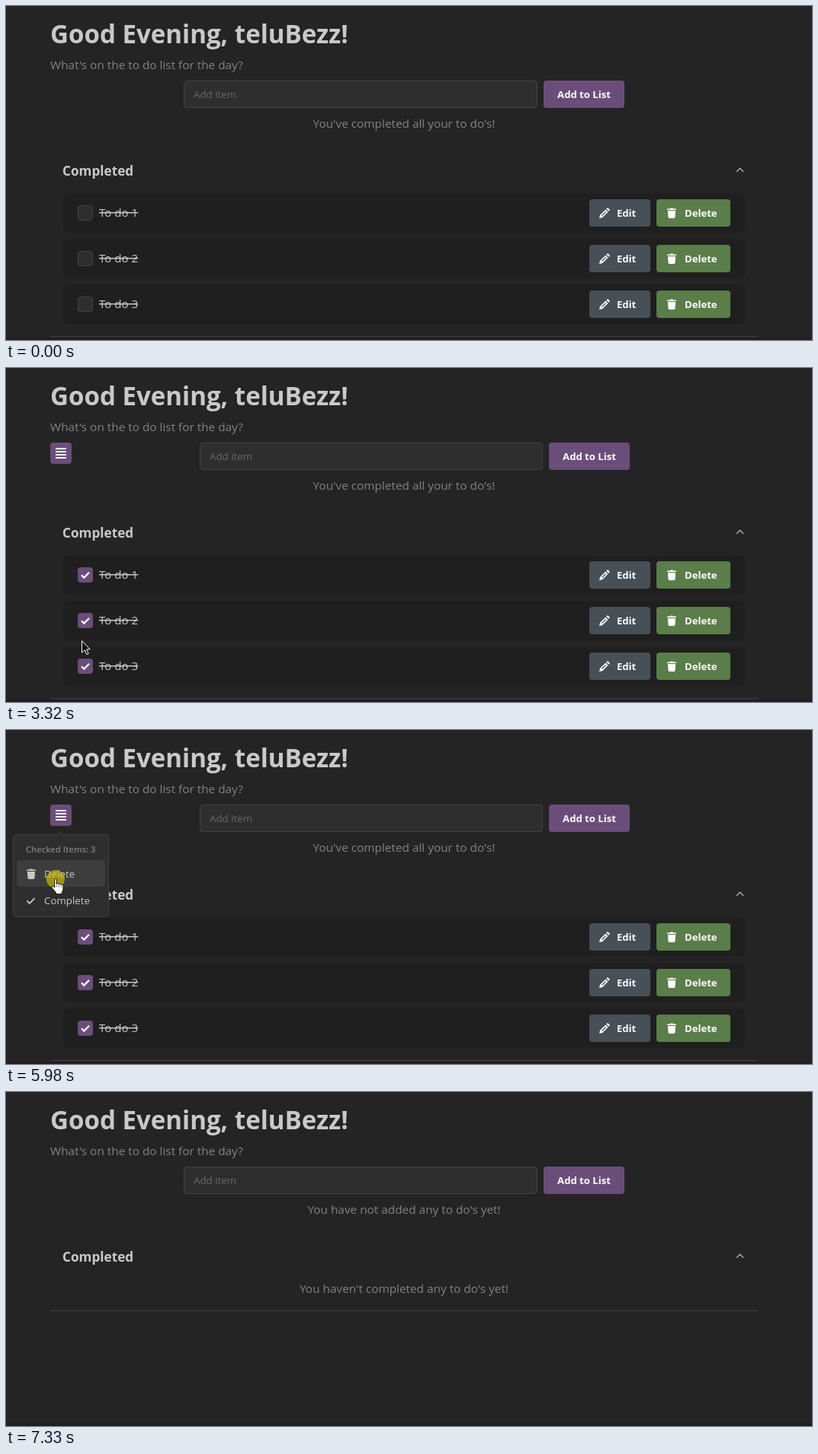
Write an HTML page that moves like this. It is 1057x439 px and loops after 7870 ms.

```html
<!DOCTYPE html>
<html lang="en">
<head>
<meta charset="utf-8">
<title>To do list</title>
<style>
html, body { margin: 0; width: 100%; height: 100%; overflow: hidden; background: #242424; }
svg { display: block; font-family: "Open Sans", "Noto Sans", sans-serif; }
.title { font-size: 33.1px; font-weight: 700; fill: #c9c9c9; }
.head { font-size: 17.2px; font-weight: 700; fill: #c9c9c9; }
.info { font-size: 15.35px; fill: #828282; }
.hint { font-size: 13.3px; fill: #696969; }
.todo { font-size: 15.1px; fill: #c9c9c9; text-decoration: line-through; }
.btn { font-size: 13.1px; font-weight: 700; fill: #fff; }
.label { font-size: 11.2px; font-weight: 600; fill: #828282; }
.item { font-size: 13.3px; fill: #c9c9c9; }
.field { fill: #2e2e2e; stroke: #424242; }
</style>
</head>
<body>
<svg id="stage" width="1057" height="439" viewBox="0 0 1057 439"></svg>
<script>
const LOOP = 7870;
const PURPLE = '#6b4d7a';
const TRASH = 'M0 1.5H3.8L4.5.6H7.5L8.2 1.5H12V3H0ZM.9 4H11.1L10.5 12.6Q10.4 14 9 14H3Q1.6 14 1.5 12.6Z';
const PENCIL = 'M0 14L1 9.8 8.3 2.5 11.5 5.7 4.2 13ZM9.2 1.6L10.4.4Q11 0 11.6.4L13.6 2.4Q14 3 13.6 3.6L12.4 4.8Z';

const text = (cls, x, y, s, extra = '') => `<text class="${cls}" x="${x}" y="${y}" ${extra}>${s}</text>`;
const rect = (x, y, w, h, r, attrs) => `<rect x="${x}" y="${y}" width="${w}" height="${h}" rx="${r}" ${attrs}/>`;
const icon = (d, x, y, fill) => `<path d="${d}" transform="translate(${x} ${y})" fill="${fill}"/>`;
const tick = (x, y, color, width) =>
  `<path d="M${x} ${y}l3.4 3.4 6.6-6.8" fill="none" stroke="${color}" stroke-width="${width}"/>`;
const group = (id, body, attrs = '') => `<g id="${id}" ${attrs}>${body}</g>`;

function row(i) {
  const y = 246 + 60 * i;
  return rect(74, y, 896, 52, 8, 'fill="#1f1f1f"')
    + rect(94.5, y + 16.5, 19, 19, 3.5, 'class="field"')
    + group('check' + i, rect(94, y + 16, 20, 20, 4, `fill="${PURPLE}"`) + tick(99, y + 26.2, '#fff', 2.3))
    + text('todo', 122, y + 31, 'To do ' + (i + 1))
    + rect(765, y + 8, 80, 36, 4, 'fill="#474f57"')
    + icon(PENCIL, 778, y + 19, '#fff')
    + `<path d="M781.5 ${y + 29.5}l5-5" stroke="#474f57" stroke-width="1.2"/>`
    + text('btn', 801, y + 31, 'Edit')
    + rect(853, y + 8, 97, 36, 4, 'fill="#5a7d4a"')
    + icon(TRASH, 867, y + 19, '#fff')
    + text('btn', 890, y + 31, 'Delete');
}

const listIcon = [106, 110, 114, 118].map(y => `M65 ${y}h14`).join('');
const menu = rect(9.5, 137.5, 125, 108, 4, 'class="field"')
  + '<path d="M67.5 138L71.5 134 75.5 138" class="field"/>'
  + rect(14, 171, 116, 35, 4, 'id="menuHover" fill="#3d3d3d"')
  + text('label', 26, 161, 'Checked Items: 3')
  + icon(TRASH, 27, 182, '#c9c9c9') + text('item', 50, 194, 'Delete')
  + tick(27.5, 224.5, '#c9c9c9', 1.8) + text('item', 50, 229, 'Complete');

const middle = 'text-anchor="middle"';
const arrow = '<path d="M.5.5V16.2L4.2 12.7 6.8 18.6 9.2 17.5 6.6 11.8H11.2Z" fill="#0c0c0c" stroke="#fff"/>';
const hand = '<path d="M-1.2 1.2Q0-.8 1.4 1.2V7Q3.6 5.6 4.4 7.4 6.4 6.4 7.2 8.2 9.6 7.4 10 9.6V14Q10 16.5 8.2 18.4V20.6H.4V18.6L-5 12.2Q-5.6 9.8-3.4 10.2L-1.2 12Z" fill="#fff" stroke="#111"/>'
  + '<path d="M1.6 7V11M4.5 8V11.4M7.3 9V11.8" stroke="#555" stroke-width=".8"/>';

const stage = document.getElementById('stage');
stage.innerHTML =
  rect(0, 0, 1057, 439, 0, 'fill="#242424"')
  + text('title', 58, 49, 'Good Evening, teluBezz!')
  + text('info', 58, 83, "What's on the to do list for the day?")
  + rect(233.5, 98.5, 463, 35, 3.5, 'id="input" class="field"')
  + text('hint', 246, 121, 'Add item', 'id="hint"')
  + group('add', rect(705, 98, 106, 36, 4, `fill="${PURPLE}"`) + text('btn', 758, 121, 'Add to List', middle))
  + text('info', 522, 160, '', `id="status" ${middle}`)
  + rect(58, 191, 928, 50, 0, 'id="headHover" fill="#2e2e2e"')
  + text('head', 74, 223, 'Completed')
  + '<path d="M958 217.8L962.5 213.3 967 217.8" fill="none" stroke="#c9c9c9" stroke-width="1.2"/>'
  + group('rows', [0, 1, 2].map(row).join(''))
  + text('info', 522, 264, "You haven't completed any to do's yet!", `id="empty" ${middle}`)
  + rect(58, 434, 928, 1, 0, 'id="rule" fill="#444"')
  + rect(0, 435, 1057, 4, 0, 'fill="#231f20"')
  + group('tools', rect(58, 98, 28, 28, 4, `fill="${PURPLE}"`) + `<path d="${listIcon}" stroke="#fff" stroke-width="2"/>`)
  + group('menu', menu)
  + group('overlay', rect(0, 0, 1057, 439, 0, 'fill="#3b3b3b" opacity=".7"')
    + [509, 522, 535].map(x => `<circle class="dot" cx="${x}" cy="399" r="5" fill="${PURPLE}"/>`).join(''))
  + '<circle id="click" r="12" fill="#dcc800" opacity=".62"/>'
  + group('cursor', group('arrow', arrow) + group('hand', hand));

const el = {};
stage.querySelectorAll('[id]').forEach(node => el[node.id] = node);
const dots = stage.querySelectorAll('.dot');

// Each move: start, end, target x, target y
const MOVES = [
  [1130, 1900, 104, 260], [1970, 1970, 106, 266], [2240, 2240, 107, 282],
  [2300, 2440, 102, 327], [2580, 2910, 104, 378], [2980, 2980, 103, 387],
  [3190, 3730, 68, 155], [3800, 3870, 72, 111], [4280, 4420, 78, 134],
  [4490, 5030, 70, 186], [5100, 5310, 66, 198], [5640, 5840, 65, 195],
  [7200, 7200, 92, 224], [7270, 7270, 150, 318]
];
const CLICKS = [2170, 2510, 3050, 5980];
const CHECKED = [2240, 2580, 3120];

const clamp = v => Math.max(0, Math.min(1, v));
const within = (t, a, b) => t >= a && t < b;
const show = (node, on) => node.setAttribute('opacity', +on);
const smooth = p => p * p * (3 - 2 * p);

// The pointer is sampled about every 68 ms, so it moves in steps.
function pointerAt(t) {
  let x = 991, y = 117;
  for (const [start, end, toX, toY] of MOVES) {
    if (t < start) break;
    let p = 1;
    if (t < end) {
      const steps = Math.round((end - start) / 68);
      const step = Math.floor((t - start) / (end - start) * steps + 0.05);
      p = smooth((step + 1) / (steps + 1));
    }
    x += (toX - x) * p;
    y += (toY - y) * p;
  }
  return [Math.round(x), Math.round(y)];
}

function draw(t) {
  const [x, y] = pointerAt(t);
  const selecting = within(t, 2240, 6250);
  const loading = within(t, 6050, 6320);
  const menuOpen = within(t, 3800, 6050);
  const cleared = t >= 6390;
  const visible = within(t, 1130, 7330);

  el.input.setAttribute('x', selecting ? 254.5 : 233.5);
  el.input.setAttribute('width', selecting ? 449 : 463);
  el.hint.setAttribute('x', selecting ? 267 : 246);
  el.add.setAttribute('transform', `translate(${selecting ? 7 : 0} 0)`);
  el.status.textContent = cleared ? "You have not added any to do's yet!" : "You've completed all your to do's!";
  show(el.tools, selecting);
  show(el.rows, !cleared);
  show(el.empty, cleared);
  el.rule.setAttribute('y', cleared ? 287 : 434);
  CHECKED.forEach((at, i) => show(el['check' + i], t < at ? 0 : clamp(0.85 + (t - at) / 470)));

  const menuFade = t < 6050 ? clamp((t - 3780) / 200) : clamp(0.6 - (t - 6050) / 200);
  show(el.menu, menuFade);
  const onItem = menuOpen && y >= 171;
  show(el.menuHover, onItem);

  show(el.overlay, loading ? (t < 6250 ? 1 : 0.5) : 0);
  dots.forEach((dot, i) => {
    const wave = (1 - Math.cos((t - 6050) / 800 * 2 * Math.PI)) / 2;
    dot.setAttribute('r', i === 1 ? 5.2 : 5.2 - 1.5 * wave);
  });

  const onHead = visible && !menuOpen && !loading && x >= 58 && x < 986 && y >= 191 && y < 241;
  const onTools = selecting && x >= 58 && x < 86 && y >= 98 && y < 126;
  const pointing = onHead || onItem || onTools;
  show(el.headHover, onHead);
  show(el.hand, pointing);
  show(el.arrow, !pointing);
  show(el.cursor, visible);
  el.cursor.setAttribute('transform', `translate(${x} ${y})`);
  show(el.click, CLICKS.some(at => within(t, at, at + 70)) ? 0.62 : 0);
  el.click.setAttribute('cx', x);
  el.click.setAttribute('cy', y + 1);
}

const began = performance.now();
function frame() {
  draw((performance.now() - began) % LOOP);
  requestAnimationFrame(frame);
}
draw(0);
requestAnimationFrame(frame);
</script>
</body>
</html>
```
